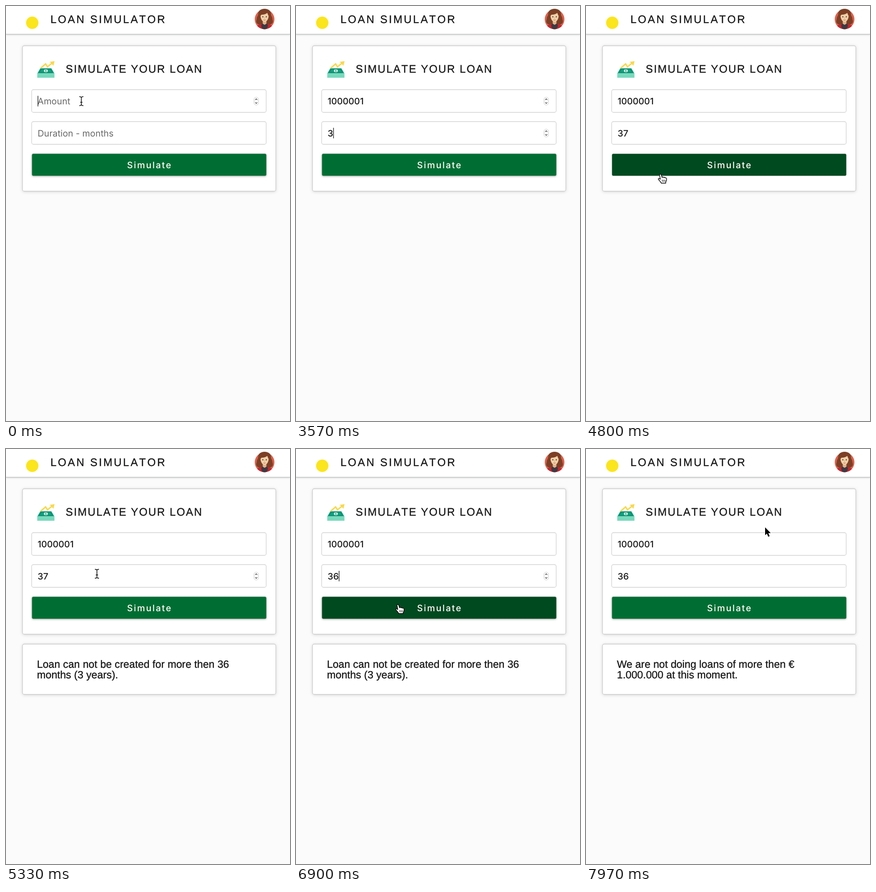
An HTML page that plays this animation: 620 px wide and 903 px high, repeating every 8 s.

```html
<!DOCTYPE html>
<html lang="en">
<head>
<meta charset="utf-8">
<title>Loan simulator</title>
<style>
  html, body { margin: 0; width: 100%; height: 100%; overflow: hidden; background: #fbfbfb; }
  svg { display: block; }
  text { fill: #161616; white-space: pre; text-rendering: geometricPrecision; }
  .head { font: 22.8px "Liberation Sans", Arial, sans-serif; stroke: #161616; stroke-width: .35; }
  .title { font-size: 23.6px; font-kerning: none; }
  .field { font: 500 19.4px Inter, Roboto, sans-serif; }
  .empty { fill: #686868; font-weight: 400; }
  .card { fill: #fff; stroke: #cbcbcb; stroke-width: 1.3; filter: drop-shadow(0 1px 3px rgba(0,0,0,.14)); }
  .input { fill: #fff; stroke: #d2d2d2; stroke-width: 1.3; }
</style>
</head>
<body>
<svg width="620" height="903" viewBox="0 0 620 903">
  <defs>
    <g id="spin">
      <rect x="-4.8" y="-8.5" width="9.6" height="17" rx="4.8" fill="#fff" stroke="#c8c8c8"/>
      <path d="M-2.3-2.6 0-5l2.3 2.4M-2.3 2.6 0 5l2.3-2.4" fill="none" stroke="#444" stroke-width="1.3"/>
    </g>
    <path id="bar" d="M-4.5-9.7Q0-10 0-7V7Q0 10-4.5 9.7M4.5-9.7Q0-10 0-7V7Q0 10 4.5 9.7M-2.5 2.5h5"/>
  </defs>

  <!-- header -->
  <rect width="620" height="61" fill="#fff" style="filter:drop-shadow(0 1px 2px rgba(0,0,0,.25))"/>
  <path d="M0 61.3H620" stroke="#bcc0bd" stroke-width="1.2"/>
  <circle cx="57.3" cy="36.5" r="13.5" fill="#fbe51c"/>
  <text class="head title" x="97" y="37" letter-spacing="3.2">LOAN SIMULATOR</text>

  <!-- avatar -->
  <clipPath id="disc"><circle cx="564.5" cy="29" r="21.5"/></clipPath>
  <circle cx="564.5" cy="29" r="21.5" fill="#de604c"/>
  <path d="M564.500 6c-9 0-14 5-14 11 0 5-3 6-3 10 0 3-2 5-1 8 1 4 5 6 10 5h16c5 1 9-1 10-5 1-3-1-5-1-8 0-4-3-5-3-10 0-6-5-11-14-11z" fill="#7c4026"/>
  <g clip-path="url(#disc)">
    <path d="M548 52v-7c1-4 5-5 10-6h13c5 1 9 2 10 6v7z" fill="#c3272f"/>
    <path d="M558.500 38.500h12l1.500 5-3.500 8h-8l-3.500-8z" fill="#3c3a42"/>
  </g>
  <path d="M560.500 32h8v6.500l-4 2.500-4-2.500z" fill="#dfb38c"/>
  <path d="M555.500 20c0-6 4-9 9-9s9 3 9 9c0 8-4 14.500-9 14.500s-9-6.500-9-14.500z" fill="#f0d0a8"/>
  <path d="M554.500 23c-1-9 4-14 10-14s11 5 10 14c-2-2-3-5-4-8-4 3-9 4-13 4-1 1-2 3-3 4z" fill="#7c4026"/>
  <circle cx="560.700" cy="23.500" r="1.200" fill="#46332b"/>
  <circle cx="568.300" cy="23.500" r="1.200" fill="#46332b"/>
  <path d="M564.500 24.500v3" stroke="#d5a47c"/>
  <path d="M562.300 30.300q2.200 1 4.400 0" fill="none" stroke="#b5534a"/>

  <!-- form -->
  <rect class="card" x="36" y="86.500" width="553" height="316.500" rx="4"/>
  <path d="M75 135.500h24l6.500 11H68.500z" fill="#12a07e"/>
  <path d="M77 137.300h20l4.500 7.500H72.500z" fill="none" stroke="#087a62"/>
  <ellipse cx="87" cy="141" rx="4.200" ry="3.200" fill="#e6f5ec"/>
  <path d="M88.500 139.400h-2.500l-.5 1.300 3 .8-.5 1.300h-2.600M87 138.700v4.800" fill="none" stroke="#12a07e" stroke-width=".8"/>
  <rect x="68.300" y="146.500" width="37.400" height="9.500" fill="#5ccfae"/>
  <path d="M68.300 148.500h37.400M68.300 151.300h37.400M68.300 154.100h37.400" stroke="#a9ead4"/>
  <path d="M76 135l10.500-9 4 6.300 10.500-8.500" fill="none" stroke="#f9d84a" stroke-width="3"/>
  <path d="M95.500 121.500l10.500-1.500-2.500 10z" fill="#f9d84a"/>
  <text class="head title" x="130.300" y="145.300" letter-spacing="1.98">SIMULATE YOUR LOAN</text>
  <rect class="input" x="56" y="182" width="512" height="49.500" rx="4"/>
  <rect class="input" x="56" y="251.500" width="512" height="49.500" rx="4"/>
  <text id="amount" class="field" x="69" y="214.300"></text>
  <text id="months" class="field" x="69" y="283.600"></text>
  <use id="spin0" href="#spin" x="546.300" y="207"/>
  <use id="spin1" href="#spin" x="546.300" y="276.500"/>
  <path id="caret" d="M0-11.500V11.500" stroke="#111" stroke-width="1.3"/>
  <rect id="button" x="56.700" y="321.500" width="511.600" height="48" rx="3" stroke="#9aa59d" stroke-width=".5"/>
  <text class="field" x="313.500" y="353.200" text-anchor="middle" letter-spacing="2.3" style="fill:#fff">Simulate</text>

  <!-- answer -->
  <g id="answer">
    <rect class="card" x="36" y="424.500" width="553" height="109.500" rx="4"/>
    <text id="line0" class="head" x="67.500" y="475.700"></text>
    <text id="line1" class="head" x="67.500" y="498.700"></text>
  </g>

  <!-- pointers -->
  <g id="pointer" stroke-linejoin="round">
    <g id="beam" fill="none">
      <use href="#bar" stroke="#fff" stroke-width="3"/>
      <use href="#bar" stroke="#111" stroke-width="1.6"/>
    </g>
    <path id="arrow" d="M0 0V17l3.900-3.600 3 7 3-1.300-2.900-6.700h5.300z" stroke="#fff" stroke-width="2.400" paint-order="stroke"/>
    <g id="hand">
      <path d="M-2.500 0c1-2 3-1.500 3.600 0l2 6c1-1.500 3-1 3.400.3 1-1 2.800-.6 3.200.7 1.500-.8 3 .2 3.200 2 .4 3-.6 5-1.800 7v2.500H1.300c-1-3-3.500-5-5.500-7.200-1.600-1.700-1-3.800 1.200-3 .8.3 1.500 1 2.200 1.600z" fill="#fff" stroke="#000" stroke-width="1.400"/>
      <path d="M3.300 11l.5 4.500M6.200 11l.3 4.500M9.200 11v4.500" stroke="#000"/>
    </g>
  </g>
</svg>
<script>
const LOOP = 8000;
const $ = id => document.getElementById(id);
const show = (id, on) => $(id).style.display = on ? '' : 'none';
const between = (v, a, b) => v >= a && v < b;

// [time, value]: each value holds until the next
const amounts = [[0, ''], [900, '1'], [1230, '10'], [1400, '100'], [1570, '1000'],
  [1770, '10000'], [1930, '100000'], [2400, '1000001']];
const months = [[0, ''], [3570, '3'], [3870, '37'], [6330, '3'], [6570, '36']];
const focus = [[0, 0], [2730, 1], [4720, -1], [5670, 1], [7120, -1]];
const answers = [[0, null],
  [5030, ['Loan can not be created for more then 36', 'months (3 years).']],
  [7400, ['We are not doing loans of more then €', '1.000.000 at this moment.']]];
const presses = [[4720, 4860], [7120, 7250]];

// [time, x, y] of the pointer's hot spot
const path = [[0, 164.500, 207], [4300, 164.500, 207], [4500, 168.500, 319.500], [4700, 163, 367],
  [5130, 163, 367], [5270, 188, 288], [5330, 198.500, 271.500], [5430, 200, 265],
  [5570, 198.500, 273], [6620, 198.500, 273], [6860, 223, 339.500], [7400, 223, 339.500],
  [7930, 391, 170.500], [8000, 391, 170.500]];

const at = (list, t) => list.filter(e => e[0] <= t).pop()[1];

// the caret restarts its blink at every key press and focus change
const blinkStarts = [-100, ...[...amounts, ...months, ...focus].map(e => e[0]).filter(Boolean)];

function pointerAt(t) {
  const i = path.findIndex(p => p[0] > t);
  const [a, b] = [path[i - 1], path[i]];
  const k = (t - a[0]) / (b[0] - a[0]);
  return [a[1] + (b[1] - a[1]) * k, a[2] + (b[2] - a[2]) * k];
}

// sets a field's text and returns where its caret stands
function fill(id, value, hint) {
  $(id).textContent = value || hint;
  $(id).classList.toggle('empty', !value);
  return 69.700 + (value ? $(id).getComputedTextLength() : 0);
}

function draw(t) {
  const ends = [fill('amount', at(amounts, t), 'Amount'),
    fill('months', at(months, t), 'Duration - months')];
  const focused = at(focus, t);
  const [x, y] = pointerAt(t);
  const over = [between(y, 182, 232), between(y, 251, 301)];
  const onButton = between(y, 321, 370);
  const pressed = presses.some(([a, b]) => between(t, a, b));

  over.forEach((on, i) => show('spin' + i, on || focused === i));
  const since = t - Math.max(...blinkStarts.filter(s => s <= t));
  show('caret', focused >= 0 && since % 1000 < 500);
  if (focused >= 0)
    $('caret').setAttribute('transform', `translate(${ends[focused]} ${[207, 276.500][focused]})`);

  $('button').setAttribute('fill', onButton ? '#004a20' : '#006e33');
  $('button').style.filter = pressed ? 'none' : 'drop-shadow(0 1px 2px rgba(0,0,0,.3))';

  const answer = at(answers, t);
  show('answer', answer);
  if (answer) answer.forEach((line, i) => $('line' + i).textContent = line);

  const inField = over[0] || over[1];
  show('pointer', t < 900 || between(t, 4300, 6330) || t >= 6620);
  $('pointer').setAttribute('transform', `translate(${x} ${y})`);
  show('beam', inField);
  show('hand', onButton);
  show('arrow', !inField && !onButton);
}

const start = performance.now();
function tick() {
  draw((performance.now() - start) % LOOP);
  requestAnimationFrame(tick);
}
tick();
</script>
</body>
</html>
```
